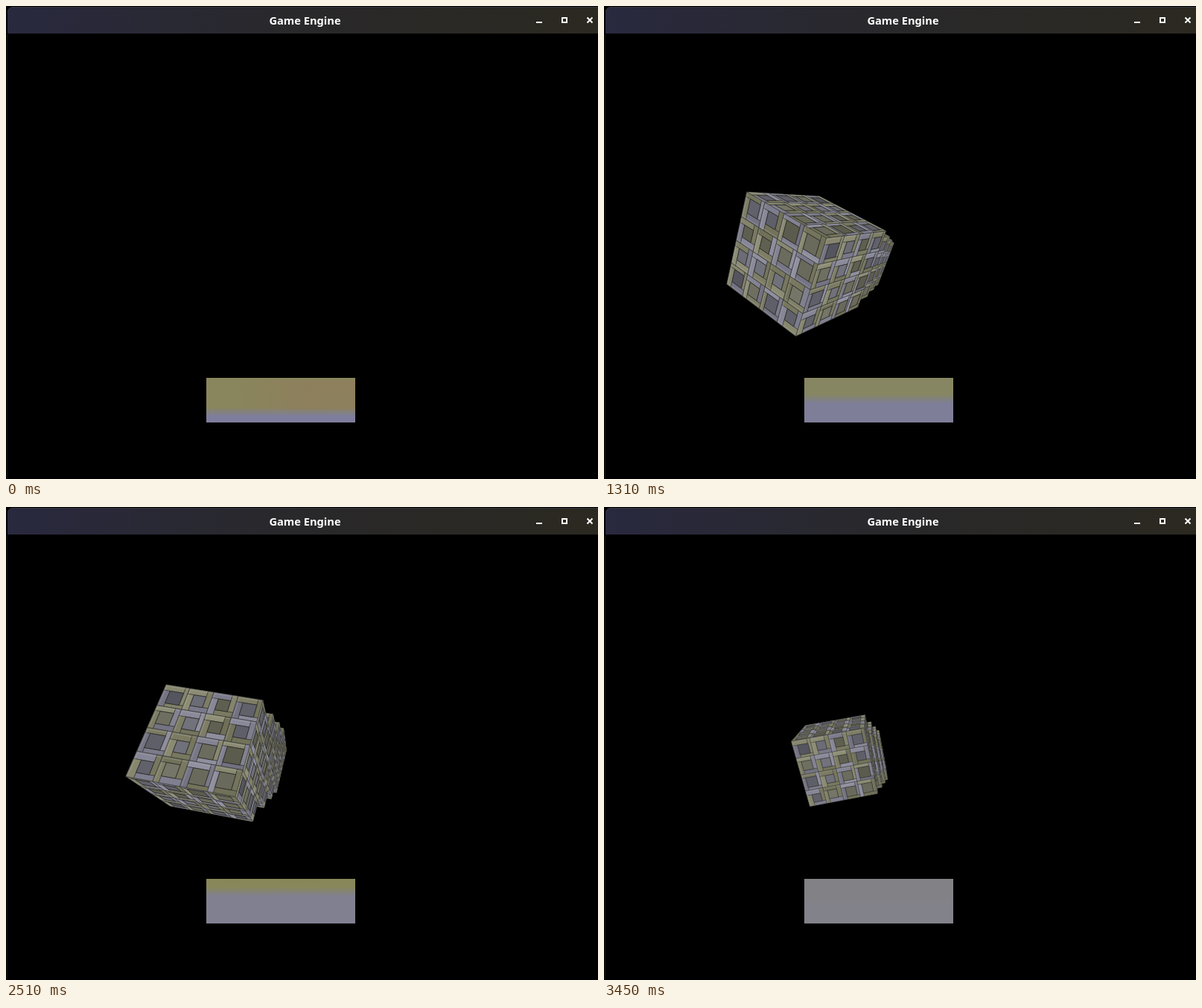
These frames come from a looping animation (795x636 px, 3.48 s). An HTML page with a canvas:

```html
<!DOCTYPE html>
<html lang="en">
<head>
<meta charset="utf-8">
<title>Game Engine</title>
<style>
  html, body { margin: 0; width: 100%; height: 100%; overflow: hidden; background: #000; }
  canvas, svg { position: absolute; left: 0; top: 0; display: block; }
  text { font: 600 14.67px "Noto Sans", "Open Sans", sans-serif; fill: #fff; text-anchor: middle; }
</style>
</head>
<body>
<canvas id="view" width="795" height="636"></canvas>
<svg width="795" height="636" viewBox="0 0 795 636">
  <defs>
    <linearGradient id="bar">
      <stop offset="0" stop-color="#29293f"/>
      <stop offset=".5" stop-color="#29282a"/>
      <stop offset="1" stop-color="#2b2920"/>
    </linearGradient>
  </defs>
  <path d="M2 37V9q0-8 8-8H795V37z" fill="url(#bar)"/>
  <path d="M2.5 9q0-7.500 7.500-7.500H795" fill="none" stroke="#34343c"/>
  <path d="M1.500 38V636" stroke="#151500"/>
  <text x="401.500" y="25">Game Engine</text>
  <g fill="none" stroke="#fff" stroke-width="2">
    <path d="M712 22h8"/>
    <rect x="747" y="16" width="6" height="6"/>
    <path d="M780.500 15.500l7 7m0-7l-7 7"/>
  </g>
</svg>
<script>
const LOOP = 3480, SHOW = 790;
const FOCAL = 428, CX = 402, CY = 337;
const CUBES = 4, GAP = 2, CELLS = 4;
const ctx = document.getElementById('view').getContext('2d');

// time, distance, right axis, up axis
const POSES = [
  [1010, 7.2,  [.728, -.497, .468], [.5, -.08, -.862]],
  [1640, 6.3,  [.9, -.38, .2],      [.35, .35, -.87]],
  [2510, 6.85, [.983, -.17, .074],  [.185, .901, -.393]],
  [3080, 8.85, [.996, .055, -.08],  [-.04, .983, .134]],
  [3450, 9.95, [.975, .18, -.044],  [-.156, .926, .32]]
];

// time, top colour, bottom colour, height of the blend
const PANEL = [
  [0,    [137, 133, 92],  [126, 125, 156], .76],
  [570,  [136, 134, 92],  [126, 125, 156], .78],
  [1010, [136, 135, 86],  [126, 126, 158], .53],
  [1640, [132, 132, 112], [127, 127, 145], .4],
  [2510, [136, 135, 90],  [128, 128, 144], .28],
  [3080, [135, 128, 131], [131, 129, 134], .5],
  [3450, [130, 130, 134], [130, 130, 138], .5]
];

const lerp = (a, b, k) => Array.isArray(a) ? a.map((v, i) => lerp(v, b[i], k)) : a + (b - a) * k;
const dot = (a, b) => a[0] * b[0] + a[1] * b[1] + a[2] * b[2];
const cross = (a, b) => [
  a[1] * b[2] - a[2] * b[1],
  a[2] * b[0] - a[0] * b[2],
  a[0] * b[1] - a[1] * b[0]
];
const add = (a, b, k = 1) => a.map((v, i) => v + b[i] * k);
const unit = a => a.map(v => v / Math.hypot(...a));
const rgb = c => `rgb(${c.map(Math.round)})`;

function sample(keys, t) {
  let i = 0;
  while (i < keys.length - 2 && t > keys[i + 1][0]) i++;
  const a = keys[i], b = keys[i + 1];
  return lerp(a, b, (t - a[0]) / (b[0] - a[0]));
}

function seeded(s) {
  return () => (s = (s * 16807) % 2147483647) / 2147483647;
}

// One stone pattern shared by all faces: slabs with a sunken square
const rnd = seeded(4711);
const stones = [];
for (let i = 0; i < CELLS * CELLS; i++) {
  const tone = () => {
    const l = 112 + rnd() * 32, b = rnd() < .5 ? 16 : -24;
    return [l, l, l + b];
  };
  const dark = 84 + rnd() * 36;
  stones.push({
    x: i % CELLS, y: Math.floor(i / CELLS),
    slabs: [tone(), tone(), tone(), tone()].map(rgb),
    core: rgb([dark, dark, dark + (rnd() < .5 ? 10 : -14)]),
    a: .2 + rnd() * .1, b: .74 + rnd() * .1
  });
}

function quad(map, x0, y0, x1, y1) {
  ctx.beginPath();
  for (const [x, y] of [[x0, y0], [x1, y0], [x1, y1], [x0, y1]]) ctx.lineTo(...map(x, y));
  ctx.closePath();
}

function drawFace(mid, u, v, depth) {
  const map = (x, y) => {
    const p = add(add(mid, u, x * 2 / CELLS - 1), v, 1 - y * 2 / CELLS);
    return [CX - FOCAL * p[0] / p[2], CY + FOCAL * p[1] / p[2]];
  };
  quad(map, 0, 0, CELLS, CELLS);
  ctx.fillStyle = '#7b7b76';
  ctx.fill();
  ctx.lineWidth = Math.min(1, 6 / depth);
  for (const s of stones) {
    const part = (x0, y0, x1, y1, fill, line) => {
      quad(map, s.x + x0, s.y + y0, s.x + x1, s.y + y1);
      ctx.fillStyle = fill;
      ctx.fill();
      ctx.strokeStyle = line;
      ctx.stroke();
    };
    const { a, b, slabs } = s, edge = 'rgba(48,48,46,.6)';
    part(0, 0, b, a, slabs[0], edge);
    part(b, 0, 1, b, slabs[1], edge);
    part(a, b, 1, 1, slabs[2], edge);
    part(0, a, a, 1, slabs[3], edge);
    part(a, a, b, b, s.core, 'rgba(38,38,36,.8)');
    // Light catching the upper left rim of the slab
    ctx.beginPath();
    for (const [x, y] of [[.06, .94], [.06, .06], [.94, .06]]) ctx.lineTo(...map(s.x + x, s.y + y));
    ctx.strokeStyle = 'rgba(176,176,178,.4)';
    ctx.stroke();
  }
}

function drawCubes(t) {
  const [, dist, right, up] = sample(POSES, t);
  const e1 = unit(right);
  const e2 = unit(add(up, e1, -dot(up, e1)));
  const axes = [e1, e2, cross(e1, e2)];
  for (let k = CUBES - 1; k >= 0; k--) {
    const center = [-2, 0, -dist - k * GAP];
    for (let i = 0; i < 3; i++) {
      for (const side of [-1, 1]) {
        const n = axes[i].map(c => c * side);
        const mid = add(center, n);
        if (dot(n, mid) >= 0) continue;
        drawFace(mid, axes[(i + 1) % 3], axes[(i + 2) % 3].map(c => c * side), -mid[2]);
      }
    }
  }
}

function drawPanel(t) {
  const [, top, bottom, split] = sample(PANEL, t);
  const g = ctx.createLinearGradient(0, 500, 0, 560);
  g.addColorStop(0, rgb(top));
  g.addColorStop(Math.max(0, split - .1), rgb(top));
  g.addColorStop(Math.min(1, split + .1), rgb(bottom));
  g.addColorStop(1, rgb(bottom));
  ctx.fillStyle = g;
  ctx.fillRect(269, 500, 200, 60);

  const warm = .35 * Math.max(0, 1 - t / 1100);
  if (!warm) return;
  const w = ctx.createLinearGradient(310, 0, 400, 0);
  w.addColorStop(0, 'rgba(150,118,94,0)');
  w.addColorStop(1, `rgba(150,118,94,${warm})`);
  ctx.fillStyle = w;
  ctx.fillRect(269, 503, 200, 40);
}

const start = performance.now();
function frame() {
  const t = (performance.now() - start) % LOOP;
  ctx.fillStyle = '#000';
  ctx.fillRect(0, 0, 795, 636);
  if (t >= SHOW) drawCubes(t);
  drawPanel(t);
  requestAnimationFrame(frame);
}
frame();
</script>
</body>
</html>
```
